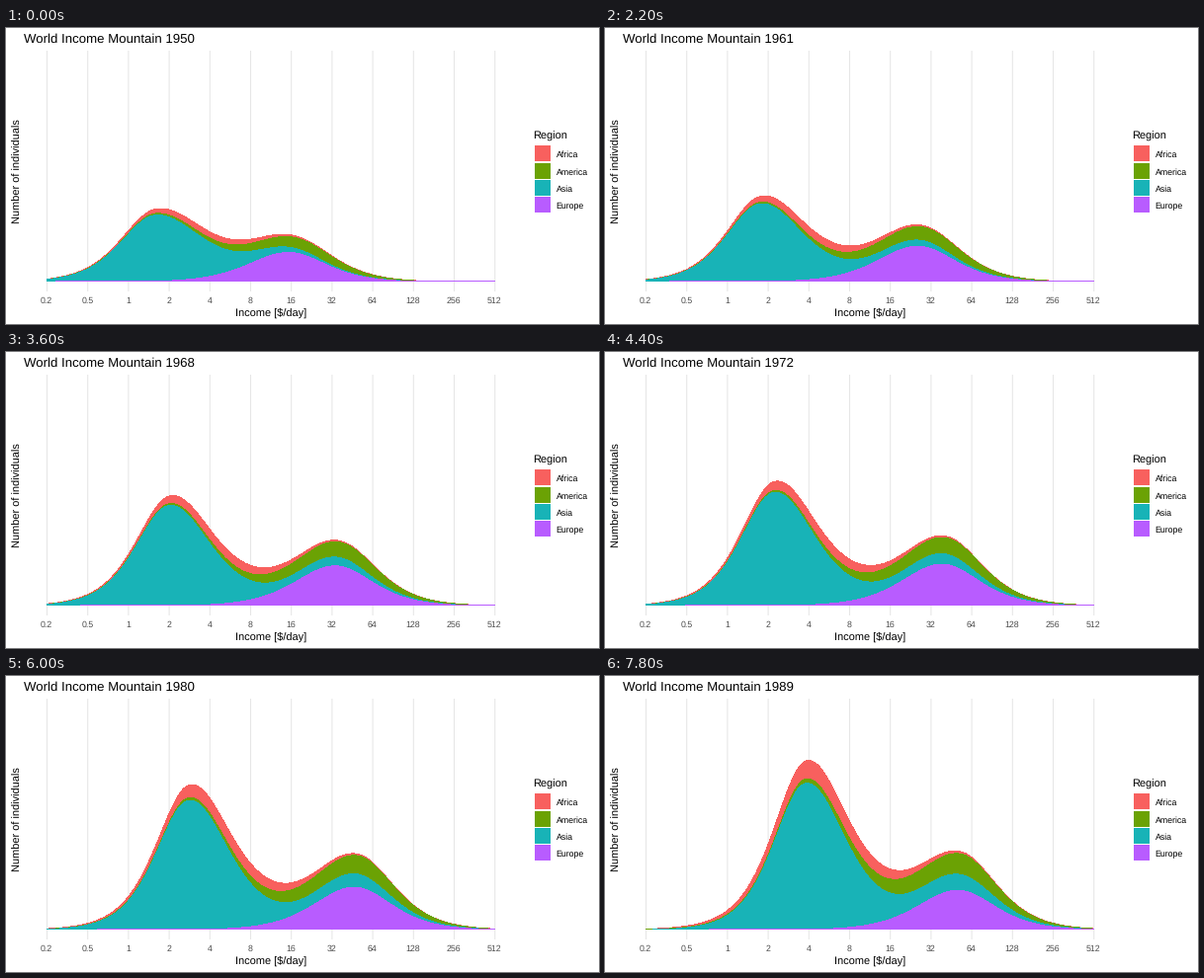
Write a matplotlib script that moves like this. It is 600x300 px and loops after 8000 ms.

```python
import numpy as np
import matplotlib
import matplotlib.pyplot as plt
from matplotlib.animation import FuncAnimation
from matplotlib.patches import Polygon, Rectangle

matplotlib.rcParams["font.family"] = "Liberation Sans"
matplotlib.rcParams["text.hinting"] = "none"

W, H, DPI = 600, 300, 100
BASE = 257
LEFT, STEP, TICKS = 41.5, 41.2, 12
FIRST, COUNT = 1950, 40
COLORS = {"Africa": "#F8605E", "America": "#6BA204",
          "Asia": "#18B3B7", "Europe": "#B85CFF"}

x = np.arange(LEFT, LEFT + STEP * (TICKS - 1) + 0.5, 0.5)


def hump(centre, height, left, right):
    """Peaked curve with long tails and its own spread on each side."""
    spread = np.where(x < centre, left, right)
    return height / np.cosh((x - centre) / spread) ** 2


def pulse(t, middle, width):
    return np.exp(-((t - middle) / width) ** 2)


def stack_tops(t):
    """Heights of the stacked areas, bottom layer first; t runs from 0 to 1."""
    rich = 286 + 71 * np.sin(np.pi * t / 2)
    europe = hump(rich, 30 + 13.5 * np.sin(2.18 * t) ** 1.4, 54, 50)

    # Asia grows richer with an early surge, then a setback around 1962
    poor = 151 + 53 * t ** 1.6 + 11 * pulse(t, 0.13, 0.09)
    size = 67 + 81 * t ** 0.9 - 16 * pulse(t, 0.33, 0.13)
    asia = hump(poor, size, 48 - 4 * t, 53 + 9 * np.exp(-5 * t))
    asia += (0.06 + 0.3 * t) * europe

    america = hump(rich + 18 - 15 * t, 11 + 10 * t, 95 + 15 * t, 52)
    africa = hump(193 + 27 * t, 6.5 + 6 * t + 7 * t * t, 67, 81)

    tops = np.cumsum([europe, asia, america, africa], axis=0)
    tops[0] = np.where(x > 50 + 55 * t, np.maximum(tops[0], 1), tops[0])
    tops[3] = np.maximum(tops[3], 1)
    return dict(zip(reversed(COLORS), tops))


def outline(top):
    # Aliased fills colour every touched pixel, hence the half pixel less
    ys = BASE - np.maximum(top - 0.5, 0)
    return np.vstack([[x[0], BASE], np.column_stack([x, ys]), [x[-1], BASE]])


fig = plt.figure(figsize=(W / DPI, H / DPI), dpi=DPI, facecolor="white")
ax = fig.add_axes([0, 0, 1, 1])
ax.set_xlim(0, W)
ax.set_ylim(H, 0)
ax.axis("off")


def label(px, py, text, size, color="black", **kw):
    return ax.text(px, py, text, fontsize=size * 72 / DPI, color=color,
                   va="baseline", **kw)


for k in range(TICKS):
    px = LEFT + STEP * k
    ax.plot([px, px], [23, 267], color="#E6E6E6", lw=1.07 * 72 / DPI,
            solid_capstyle="butt", snap=False, zorder=1)
    value = 2.0 ** (k - 2)
    name = f"{value:.0f}" if value >= 1 else f"{value:.1f}"
    label(px - 0.3, 279, name, 8.8, "#4D4D4D", ha="center")

title = label(18, 15, "", 13.2)
label(268, 292, "Income [$/day]", 11, ha="center")
label(15.3, 145.5, "Number of individuals", 11, ha="center", rotation=90,
      rotation_mode="anchor")

label(533.4, 113, "Region", 11)
areas = {}
for k, (region, color) in enumerate(COLORS.items()):
    py = 119.2 + 17.3 * k
    ax.add_patch(Rectangle((534.8, py), 16, 16, fc=color, lw=0))
    label(556.5, py + 12, region, 8.8)
    areas[region] = ax.add_patch(
        Polygon(outline(0 * x), fc=color, lw=0, antialiased=False, zorder=2 + k))


def update(i):
    title.set_text(f"World Income Mountain {FIRST + i}")
    for region, top in stack_tops(i / (COUNT - 1)).items():
        areas[region].set_xy(outline(top))
    return [title, *areas.values()]


anim = FuncAnimation(fig, update, frames=COUNT, interval=200, repeat=True,
                     repeat_delay=0, blit=False)
plt.show()
```
